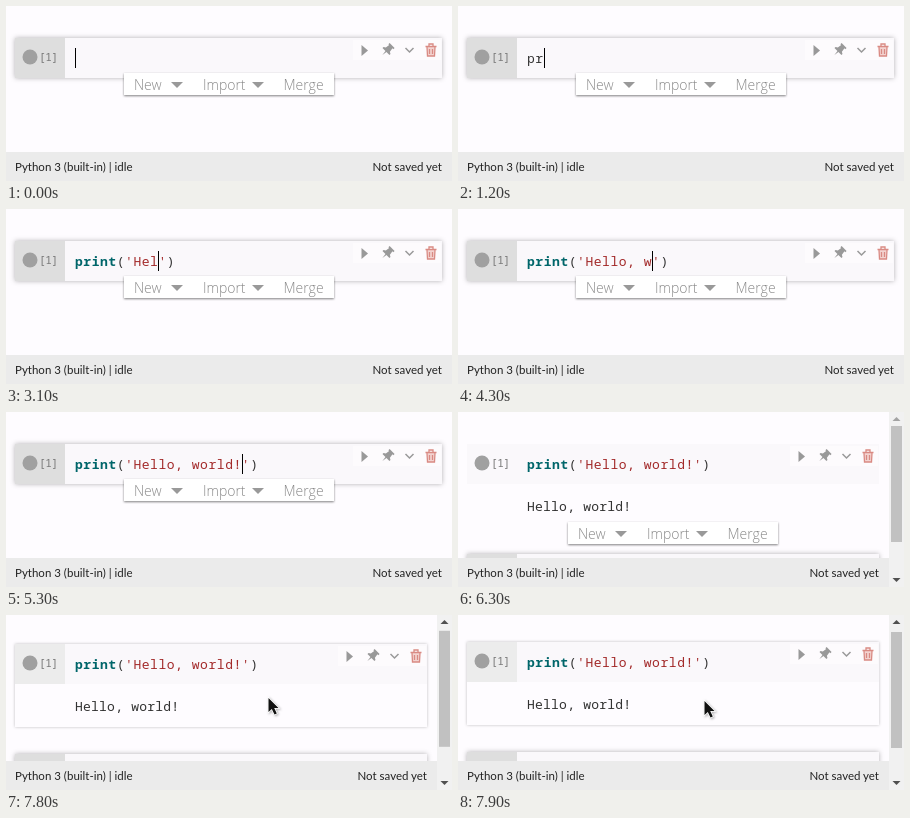
Animation of 446x175 px, one loop 8 s. Source, as an HTML page:

```html
<!DOCTYPE html>
<html lang="en">
<head>
<meta charset="utf-8">
<title>Notebook cell</title>
<style>
html, body { margin: 0; width: 100%; height: 100%; overflow: hidden; background: #fefcff; }
svg { display: block; }
text { white-space: pre; }
.code { font: 13px "Noto Sans Mono", monospace; letter-spacing: .54px; fill: #333; }
.out { font: 13px "Noto Sans Mono", monospace; letter-spacing: .23px; fill: #333; }
.key { font-weight: 700; fill: #00666a; }
.str { fill: #a32a2a; }
.count { font: 11px "Noto Sans Mono", monospace; letter-spacing: -.3px; fill: #777; }
.menu { font: 300 14px "Open Sans", sans-serif; fill: #888; }
.status { font: 11.5px Lato, sans-serif; fill: #222; }
.lift { filter: drop-shadow(0 0 2.5px rgba(0,0,0,.3)); }
.hover { filter: drop-shadow(0 0 1.5px rgba(0,0,0,.25)); }
.drop { filter: drop-shadow(0 1px 1.2px rgba(0,0,0,.5)); }
.mouse { paint-order: stroke; filter: drop-shadow(1px 1px 1px rgba(0,0,0,.3)); }
</style>
</head>
<body>
<svg id="stage" width="446" height="175"></svg>
<script>
const LOOP = 8000, CHAR = 8.34, LEFT = 69;
const LINE = "print('Hello, world!')";
const PAGE = "#fefcff", CELL = "#faf8fb";
// [time, caret column]
const KEYS = [[0, 0], [1000, 1], [1200, 2], [1300, 3], [1500, 5], [1800, 6], [2200, 7],
  [2800, 9], [3100, 10], [3200, 11], [3600, 12], [4100, 13], [4200, 14], [4300, 15],
  [4400, 16], [4500, 17], [4600, 18], [4800, 19], [5300, 20]];
// [time, x, y]
const MOUSE = [[7500, 410, 52], [7600, 330, 68], [7800, 262, 82], [7900, 246, 85]];

const stage = document.getElementById("stage");
const last = (list, t) => list.filter(step => step[0] <= t).pop();
const rect = (x, y, w, h, fill, more = "") =>
  `<rect x="${x}" y="${y}" width="${w}" height="${h}" fill="${fill}" ${more}/>`;
const text = (x, y, cls, s, more = "") => `<text x="${x}" y="${y}" class="${cls}" ${more}>${s}</text>`;
const span = (cls, s) => `<tspan class="${cls}">${s}</tspan>`;
const path = (d, fill, more = "") => `<path d="${d}" fill="${fill}" ${more}/>`;
const move = (x, y, s) => `<g transform="translate(${x} ${y})">${s}</g>`;

function codeLine(n) {
  if (n < 5) return text(LEFT, 57, "code", LINE.slice(0, n));
  const paren = n > 5 ? "(" : "", close = n > 5 ? ")" : "";
  const str = n > 6 ? LINE.slice(6, n) + "'" : "";
  return text(LEFT, 57, "code", span("key", "print") + paren + span("str", str) + close);
}

function icons(shift) {
  return move(-shift, 0, rect(347, 34, 88, 20, "#fdfbfd") +
    path("M355.500 39l6.500 5.500-6.500 5.500z", "#999") +
    path("M-3.500-6.500h7v1.800h-1.200l.6 4.200 2 1.200v1.500h-4.200l-.7 5-.7-5h-4.200v-1.500l2-1.200.6-4.200h-1.200z",
      "#999", 'transform="translate(381.500 44) rotate(45)"') +
    path("M399.500 42l4 4 4-4", "none", 'stroke="#999" stroke-width="1.500"') +
    path("M421 41l.5 9h7l.5-9z", "#f3d3d0") +
    path("M419.500 40.500h11M423 40v-2h4v2M421 41l.5 9h7l.5-9M423.500 43v5M426.500 43v5",
      "none", 'stroke="#d98a83" stroke-width="1.300"'));
}

const prompt = () => '<circle cx="24" cy="51" r="7.500" fill="#a0a0a0"/>' + text(33, 55, "count", "[1]");

const menu = (x, y) => move(x, y,
  rect(0, 0, 210, 22, "#fff", 'class="drop"') +
  text(10, 17, "menu", "New") + path("M47 9h12l-6 6z", "#999") +
  text(79, 17, "menu", "Import") + path("M128 9h12l-6 6z", "#999") +
  text(159.5, 17, "menu", "Merge"));

const statusBar = w => rect(0, 146, w, 29, "#ebebeb") +
  text(9, 165, "status", "Python 3 (built-in) | idle") +
  text(w - 10, 165, "status", "Not saved yet", 'text-anchor="end"');

const scrollbar = scroll => rect(431, 0, 15, 175, "#f1f1f1") +
  rect(433, 14 + scroll * .6, 11, 116, "#c1c1c1") +
  path("M434.500 9l4-4 4 4z", scroll ? "#505050" : "#a3a3a3") +
  path("M434.500 166l4 4 4-4z", "#505050");

function typing(t) {
  const n = last(KEYS, t)[1], caret = Math.round(LEFT + n * CHAR);
  return rect(9, 32, 427, 40, CELL, 'class="lift"') + rect(9, 32, 50, 40, "#dedede") +
    prompt() + codeLine(n) +
    (n === 6 ? rect(111, 61, 16, 1, "#555") : "") +
    rect(caret, 42, 1, 20, "#000") +
    icons(0) + menu(118, 67) + statusBar(446);
}

function finished(t) {
  const left = t >= 7400, hover = t >= 7800;
  const scroll = t >= 7900 ? 5 : hover ? 3 : 0;
  const mouse = last(MOUSE, t);
  const page =
    (hover ? rect(9, 32, 412, 83, PAGE, 'class="hover"') : "") +
    rect(9, 32, 412, 40, CELL) + (left ? rect(9, 32, 50, 40, "#ececec") : "") +
    prompt() + codeLine(20) + icons(15) +
    text(LEFT, 99, "out", "Hello, world!") +
    rect(9, 142, 412, 40, CELL, 'class="lift"') + rect(9, 142, 50, 40, "#dedede") +
    (left ? "" : menu(110, 110));
  return move(0, -scroll, page) + statusBar(431) + scrollbar(scroll) +
    (mouse ? move(mouse[1], mouse[2],
      path("M.5 1v14l3.300-3 2.700 5.500 2.300-1.100-2.600-5.400h4.300z", "#111",
        'class="mouse" stroke="#fff" stroke-width="1.600"')) : "");
}

let shown = "";
function frame(now) {
  const t = now % LOOP;
  const next = t < 6300 ? typing(t) : finished(t);
  if (next !== shown) stage.innerHTML = shown = next;
  requestAnimationFrame(frame);
}
frame(performance.now());
</script>
</body>
</html>
```
